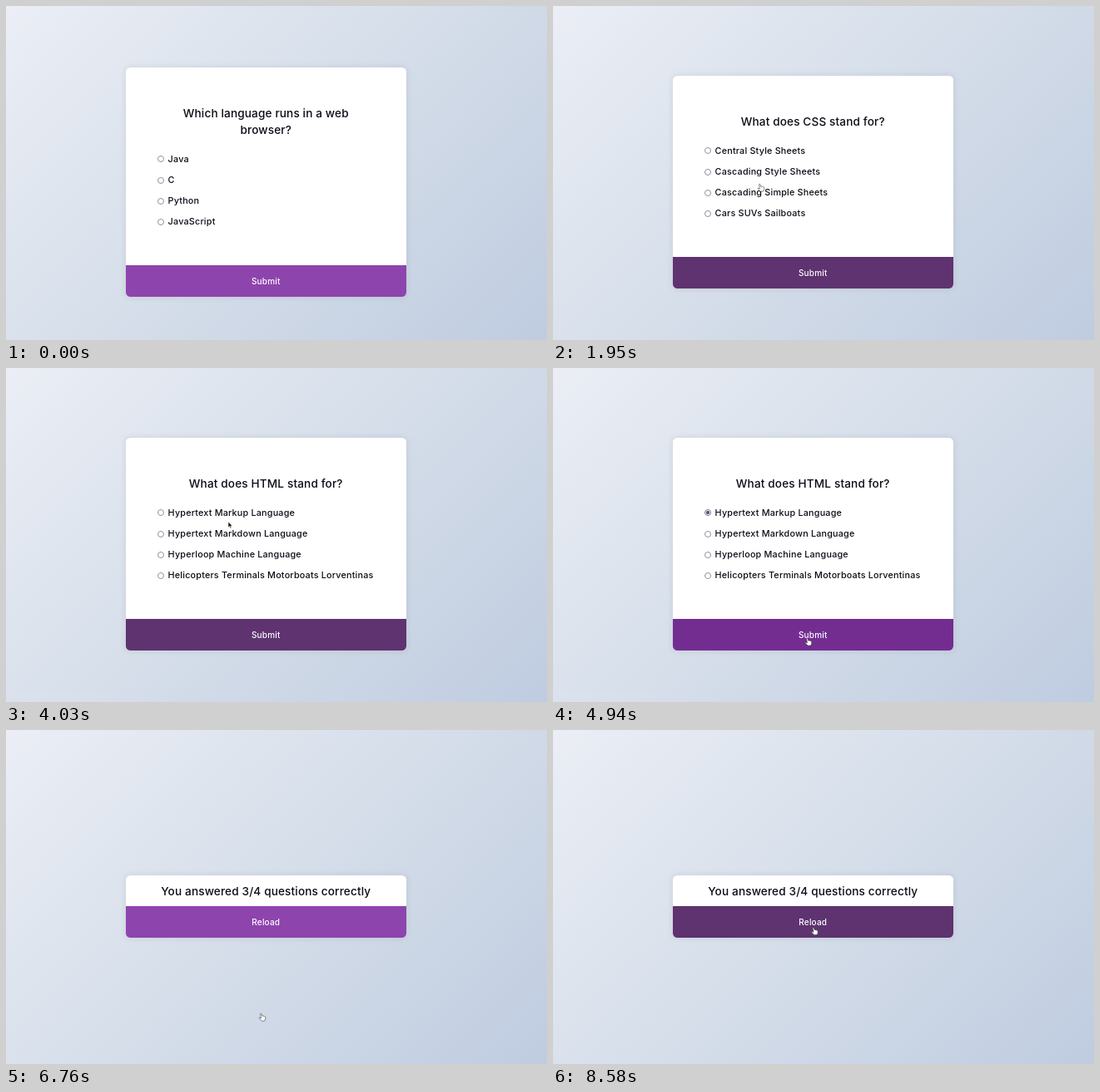
Recreate the animation shown at these times as an HTML page. Size 650 by 402 pixels, loop 8710 ms.

```html
<!DOCTYPE html>
<html lang="en">
<head>
<meta charset="utf-8">
<title>Quiz</title>
<style>
  html, body { margin: 0; width: 100%; height: 100%; overflow: hidden; }
  body {
    position: relative;
    font-family: Inter, "Open Sans", sans-serif;
    color: #0e0b16;
    background: linear-gradient(315deg, #bfcce0, #d4dde9 48%, #ebeef5);
  }
  .card {
    position: absolute; left: 144px; width: 336.5px;
    border-radius: 5.5px; overflow: hidden; background: #fff;
    box-shadow: 0 0 6px 1px rgba(100, 100, 100, .13);
  }
  h2 {
    margin: 0; padding: 45px 38px 0;
    font-size: 13.6px; font-weight: 500; line-height: 20px; letter-spacing: .01em;
    text-align: center; white-space: pre;
  }
  ul { list-style: none; margin: 0; padding: 12.8px 38px 39.4px; }
  li {
    display: flex; align-items: center; height: 25.2px;
    font-size: 10.8px; font-weight: 500; letter-spacing: .018em; white-space: nowrap;
  }
  i {
    box-sizing: border-box; flex: none; width: 8px; height: 8px;
    margin-right: 4.6px; border: 1px solid #8d929f; border-radius: 50%; background: #fff;
  }
  .on i { border-color: #71788c; background: radial-gradient(circle, #555d78 1.8px, #fff 2.4px); }
  .button {
    height: 38px; line-height: 38px; text-align: center;
    font-size: 10px; font-weight: 500; letter-spacing: .02em; color: #fff;
  }
  .result h2 { padding: 9px 0 8px; }
  .result ul { display: none; }
  svg { position: absolute; left: 0; top: 0; width: 14px; height: 16px; overflow: visible; }
</style>
</head>
<body>
<div class="card"><h2></h2><ul></ul><div class="button"></div></div>
<svg>
  <path id="arrow" fill="#151515" stroke="#fff" stroke-width=".6" transform="scale(.9)"
    d="M0 0V7.8L1.8 6.2 3 9 4.3 8.4 3.1 5.7H5.6Z"/>
  <path id="hand" fill="#fff" stroke="#333" stroke-width=".65" stroke-linejoin="round"
    transform="translate(-1.3 0) scale(.9)"
    d="M1 1.2C.8.1 2.1-.2 2.5.8L3.4 3.6C4 3.1 4.6 3.3 4.9 3.8 5.4 3.4 6 3.6 6.2 4.1 7 3.8 7.5 4.3 7.6 5L7.9 7.2 7 9.8 3.2 10.4 1.2 8.3-.7 6.6C-.9 5.7.2 5.5.9 6.1L2 6.6Z"/>
</svg>
<script>
const LOOP = 8710, STEP = 130;
const COLORS = { plain: '#8e44ad', hover: '#732d91', focus: '#5e3370' };

const slides = [
  { top: 74, title: 'Which language runs in a web\nbrowser?',
    options: ['Java', 'C', 'Python', 'JavaScript'] },
  { top: 84, title: 'What does CSS stand for?',
    options: ['Central Style Sheets', 'Cascading Style Sheets', 'Cascading Simple Sheets', 'Cars SUVs Sailboats'] },
  { top: 84, title: 'What does HTML stand for?',
    options: ['Hypertext Markup Language', 'Hypertext Markdown Language', 'Hyperloop Machine Language',
      'Helicopters Terminals Motorboats Lorventinas'] },
  { top: 74, title: 'What year was JavaScript\nlaunched?',
    options: ['1996', '1995', '1994', 'none of the above'] },
  { top: 175, title: 'You answered 3/4 questions correctly', options: [], result: true }
];

// time, slide, selected option, button state
const states = [
  [0, 0, -1, 'plain'], [780, 0, 3, 'plain'], [1170, 0, 3, 'hover'], [1430, 0, 3, 'focus'],
  [1560, 1, -1, 'focus'], [2340, 1, 0, 'plain'], [2860, 1, 0, 'hover'], [3250, 1, 0, 'focus'],
  [3380, 2, -1, 'focus'], [4290, 2, 0, 'plain'], [4680, 2, 0, 'hover'], [5070, 2, 0, 'focus'],
  [5200, 3, -1, 'focus'], [6110, 3, 1, 'plain'], [6370, 3, 1, 'hover'], [6630, 3, 1, 'focus'],
  [6760, 4, -1, 'plain'], [7930, 4, -1, 'hover'], [8450, 4, -1, 'focus']
];

// time, x, y, pointer shape until the next entry
const moves = [
  [0, 330, 410, ''], [260, 330, 400, 'arrow'], [650, 226, 257, 'hand'], [910, 226, 257, 'arrow'],
  [1170, 290, 316, 'hand'], [1300, 300, 322, 'hand'], [1820, 300, 322, 'hand'],
  [1950, 248, 214, 'hand'], [2210, 214, 173, 'hand'], [2470, 214, 173, 'arrow'],
  [2860, 288, 306.5, 'hand'], [2990, 300, 322, 'hand'], [3640, 300, 322, 'arrow'],
  [4030, 267, 185, 'arrow'], [4160, 245, 173, 'hand'], [4420, 245, 173, 'arrow'],
  [4680, 297, 312, 'hand'], [4810, 305, 325, 'hand'], [5460, 305, 325, 'arrow'],
  [5850, 224, 220, 'arrow'], [5980, 212, 208, 'hand'], [6110, 212, 208, 'arrow'],
  [6370, 295, 325, 'hand'], [6500, 306, 341, 'hand'], [7150, 306, 341, 'arrow'],
  [7930, 318, 242, 'hand'], [8190, 312.5, 237.5, 'hand'], [LOOP, 312.5, 237.5, 'hand']
];

const find = selector => document.querySelector(selector);
const card = find('.card'), title = find('h2'), list = find('ul'), button = find('.button');
const cursor = find('svg'), arrow = find('#arrow'), hand = find('#hand');
const lastAt = (table, t) => table.findLastIndex(row => row[0] <= t);
let shown = -1;

function showSlide(index) {
  const slide = slides[index];
  card.className = slide.result ? 'card result' : 'card';
  card.style.top = slide.top + 'px';
  title.textContent = slide.title;
  list.innerHTML = slide.options.map(text => `<li><i></i>${text}</li>`).join('');
  button.textContent = slide.result ? 'Reload' : 'Submit';
  shown = index;
}

function drawCursor(t) {
  const i = lastAt(moves, t);
  const [t0, x0, y0, shape] = moves[i];
  const [t1, x1, y1] = moves[i + 1];
  const k = (t - t0) / (t1 - t0);
  cursor.style.transform = `translate(${x0 + (x1 - x0) * k}px, ${y0 + (y1 - y0) * k}px)`;
  arrow.style.display = shape === 'arrow' ? '' : 'none';
  hand.style.display = shape === 'hand' ? '' : 'none';
}

function draw(time) {
  const t = Math.floor((time % LOOP) / STEP) * STEP;
  const [, slide, selected, state] = states[lastAt(states, t)];
  if (slide !== shown) showSlide(slide);
  [...list.children].forEach((item, i) => item.classList.toggle('on', i === selected));
  button.style.background = COLORS[state];
  drawCursor(t);
}

const start = performance.now();
function tick() {
  draw(performance.now() - start);
  requestAnimationFrame(tick);
}
tick();
</script>
</body>
</html>
```
